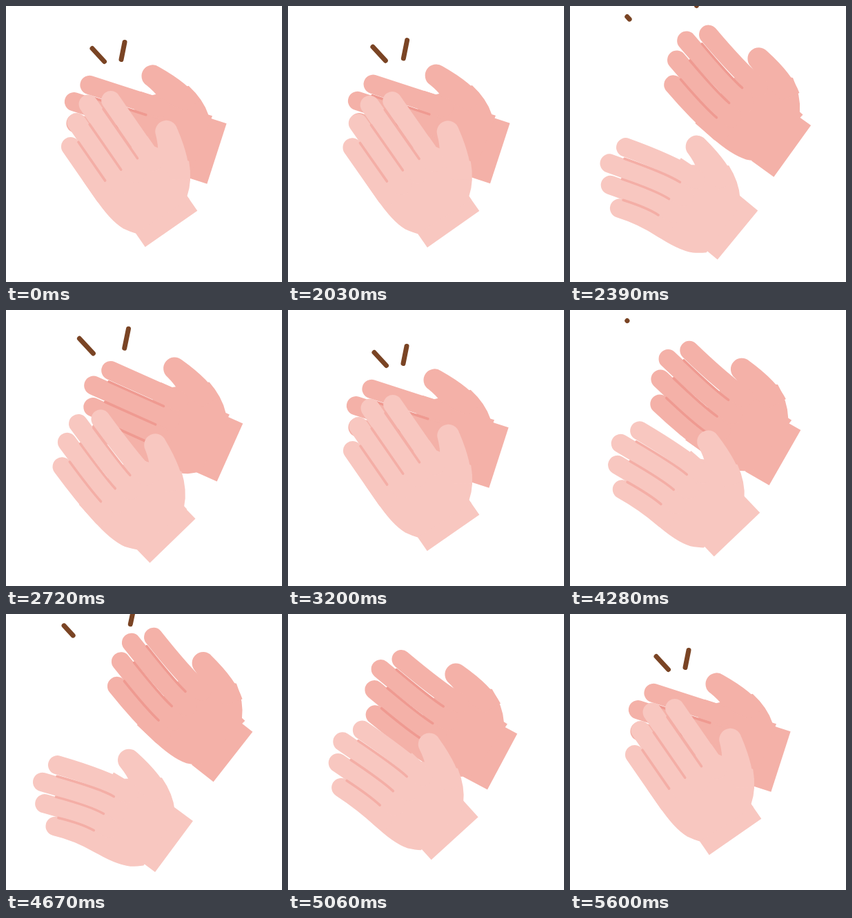
Animation, 400 px wide and 400 px high, one loop 5.63 s. Source, as an HTML page:

```html
<!DOCTYPE html>
<html lang="en">
<head>
<meta charset="utf-8">
<title>Clapping hands</title>
<style>
  html, body { margin: 0; width: 100%; height: 100%; overflow: hidden; background: #fff; }
  svg { display: block; width: 100vw; height: 100vh; }
</style>
</head>
<body>
<svg id="stage" viewBox="0 0 400 400"></svg>
<script>
const LOOP = 5630, REST = 2030, STEP = 30, CLAP = 600, SETTLE = 2880, END = 3600;
const NS = 'http://www.w3.org/2000/svg';
const stage = document.getElementById('stage');

// Values of each moving part at these moments of one clap
const TIMES = [0, 30, 120, 270, 300, 480, 600];
const FRONT = {
  x: [239.5, 239.6, 241.5, 243.5, 243.5, 242, 239.5],
  y: [323, 323.5, 334.5, 337, 337, 325.5, 323],
  turn: [-124.7, -125, -134.1, -143.4, -144.4, -133.7, -124.7],
  palm: [0, 0, 2, -6, -6.4, -5.3, 0],
  bend: [0, 0, 5.5, -14, -14.5, -10, 0],
  thumb: [0, 0, 0, 0, 0, 0, 0]
};
const BACK = {
  x: [305.5, 307.3, 324.5, 329, 330, 311.5, 305.5],
  y: [214, 213.5, 206.5, 207, 206.7, 214, 214],
  turn: [197.9, 198.1, 204.1, 218.1, 218.8, 209.8, 197.9],
  palm: [0, 0, 0, 5, 5, 5, 0],
  bend: [0, 0, 0, 8, 8.5, 8.5, 0],
  thumb: [0, 0, 0, -10, -10, -10, 0]
};
const SPARK = {
  outer: [0, .05, .44, .97, 1, 1, 1],
  inner: [0, .02, .27, .76, .83, .998, .998]
};

// Finger: [length, offset]; crease: [length, offset]
const FINGERS = [[181, -52], [205, -25], [217, 4], [203, 34]];
const CREASES = [[180, -39], [192, -11], [199, 18]];
const PALM = 'M20 46H26Q40 65 66 77L112 48H130V-65.5H100Q60 -66 40 -57Q30 -51 24 -46Z';
const THUMB = 'M44 62Q66 80 115.5 90A16 16 0 0 0 124.5 59Q111 54 100 46L60 40Z';

function add(parent, tag, attrs) {
  const el = document.createElementNS(NS, tag);
  for (const k in attrs) el.setAttribute(k, attrs[k]);
  return parent.appendChild(el);
}

// Monotone cubic curve through the values
function curve(v, t) {
  let i = 0;
  while (i < TIMES.length - 2 && t > TIMES[i + 1]) i++;
  const rise = j => (v[j + 1] - v[j]) / (TIMES[j + 1] - TIMES[j]);
  const slope = j => {
    if (j === 0 || j === TIMES.length - 1) return 0;
    const a = rise(j - 1), b = rise(j);
    return a * b <= 0 ? 0 : 2 * a * b / (a + b);
  };
  const w = TIMES[i + 1] - TIMES[i], u = (t - TIMES[i]) / w, q = 1 - u;
  return v[i] * q * q * (1 + 2 * u) + v[i + 1] * u * u * (3 - 2 * u)
    + w * u * q * (slope(i) * q - slope(i + 1) * u);
}

const mix = (a, b, k) => a + (b - a) * k;

// Rotation about the knuckles
function swing(x, y, deg) {
  const r = deg * Math.PI / 180, c = Math.cos(r), s = Math.sin(r);
  const dx = x - 130, dy = y - 15;
  return (130 + dx * c - dy * s).toFixed(2) + ' ' + (15 + dx * s + dy * c).toFixed(2);
}

function makeHand(rig, skin, line, shift) {
  const root = add(stage, 'g', { fill: skin });
  add(root, 'path', { d: 'M0 -46H40V46H0Z' });
  const palm = add(root, 'g', {});
  const body = add(palm, 'g', { transform: shift });
  add(body, 'path', { d: PALM });
  const thumb = add(body, 'path', { d: THUMB });
  const stroke = (color, width) => add(body, 'path',
    { fill: 'none', stroke: color, 'stroke-width': width, 'stroke-linecap': 'round' });
  const fingers = FINGERS.map(() => stroke(skin, 27.5));
  const creases = CREASES.map(() => stroke(line, 3.6));

  const bendAll = (paths, specs, from, deg) => paths.forEach((p, i) => {
    const [len, off] = specs[i];
    p.setAttribute('d', `M${from} ${off}Q${swing(135, off, deg / 4)} ${swing(len, off, deg)}`);
  });

  return (t, k) => {
    const val = name => mix(curve(rig[name], t), rig[name][0], k);
    root.setAttribute('transform', `translate(${val('x')} ${val('y')}) rotate(${val('turn')})`);
    palm.setAttribute('transform', `rotate(${val('palm')})`);
    thumb.setAttribute('transform', `rotate(${val('thumb')} 70 62)`);
    bendAll(fingers, FINGERS, 95, val('bend'));
    bendAll(creases, CREASES, 112, val('bend'));
  };
}

function makeSpark(outer, inner, far) {
  const el = add(stage, 'line', { stroke: '#7a4424', 'stroke-width': 7, 'stroke-linecap': 'round' });
  return (t, shown) => {
    el.setAttribute('visibility', shown ? 'visible' : 'hidden');
    const a = curve(SPARK.outer, t), b = curve(SPARK.inner, t);
    el.setAttribute('x1', mix(outer[0], far[0], a));
    el.setAttribute('y1', mix(outer[1], far[1], a));
    el.setAttribute('x2', mix(inner[0], far[0], b));
    el.setAttribute('y2', mix(inner[1], far[1], b));
  };
}

const hands = [
  makeHand(BACK, '#f4b1a8', '#ef9a91', 'translate(3 4)'),
  makeHand(FRONT, '#f8c7c0', '#f4aea6', 'translate(0 0)')
];
const sparks = [
  makeSpark([125, 61.5], [142.5, 80.5], [82.8, 15.5]),
  makeSpark([172, 52.5], [167, 77.5], [184.5, -5])
];

function draw(ms) {
  const t = ms % LOOP;
  const s = t < REST ? 0 : Math.min(END, (Math.floor((t - REST) / STEP) + 1) * STEP);
  const settling = s > SETTLE;
  const phase = s === END ? 0 : Math.min(s, SETTLE) % CLAP;
  const k = settling ? (1 - Math.cos(Math.PI * (s - SETTLE) / (END - SETTLE))) / 2 : 0;
  hands.forEach(h => h(phase, k));
  sparks.forEach(p => p(phase, !settling || s === END));
}

const start = performance.now();
function tick() {
  draw(performance.now() - start);
  requestAnimationFrame(tick);
}
tick();
</script>
</body>
</html>
```
